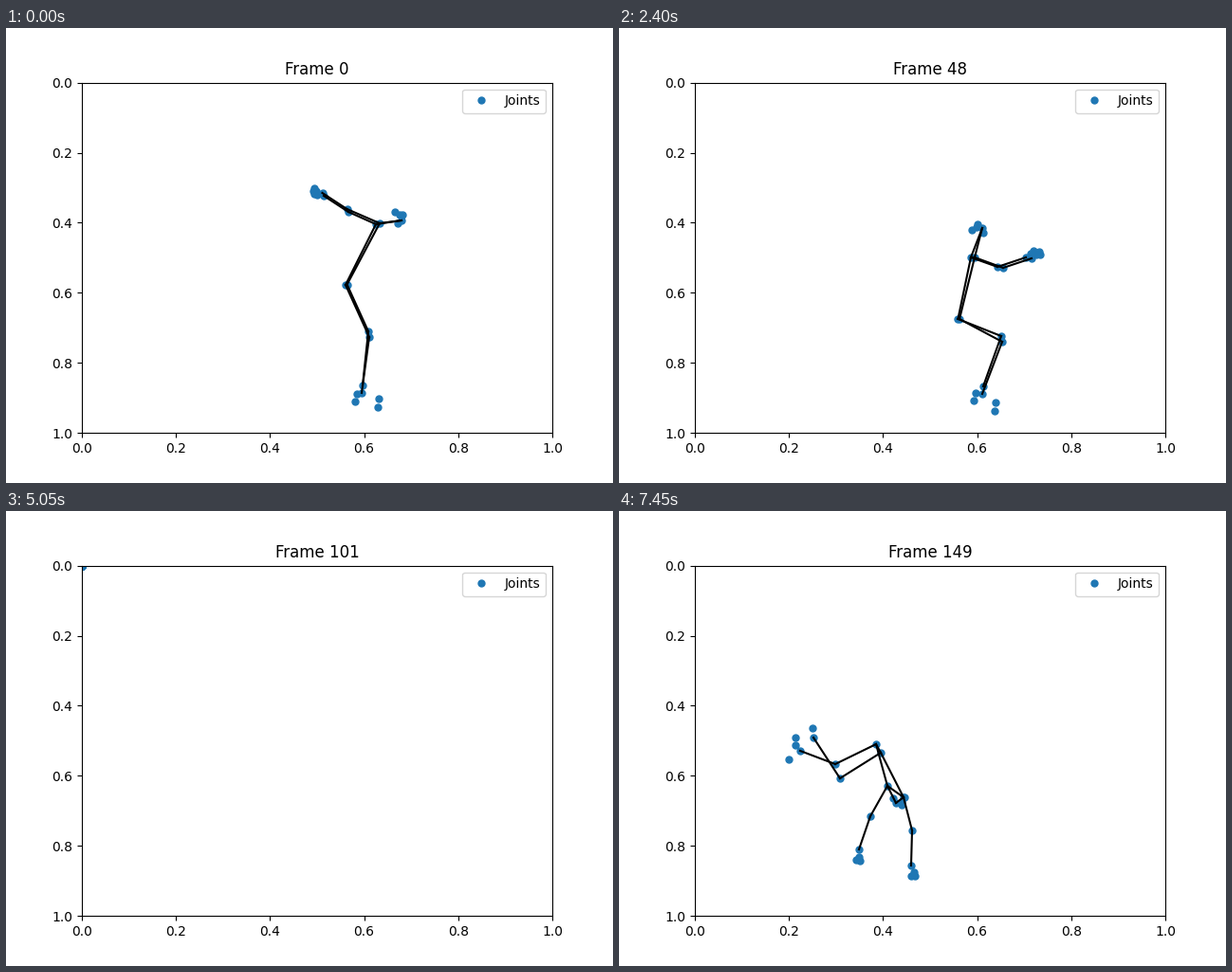
A matplotlib script for the animation above (7.5 s loop, 640x480 px).

```python
import numpy as np
import matplotlib.pyplot as plt
from matplotlib.animation import FuncAnimation

FRAMES = 150
SHOULDER, ELBOW, WRIST, HIP, KNEE, ANKLE = range(6)
NEAR, NOSE, FAR = 0, 6, 7  # six joints, the nose, six joints


def polar(r, deg):
    return r * np.exp(1j * np.radians(deg))


def points(*xy):
    return np.array(xy[::2]) + 1j * np.array(xy[1::2])


def profile(body, shoulder, arm):
    """Side view: the far limbs are the near ones, slightly shifted."""
    shift = [shoulder, arm, arm, 0.4 * shoulder, -1 - 6j, 1 - 8j]
    return np.concatenate([body, body[:NOSE] + shift])


def turn(pose, deg, hips, scale=1.0):
    """Rotate a pose about its hips and move the hips."""
    pivot = (pose[NEAR + HIP] + pose[FAR + HIP]) / 2
    return hips + (pose - pivot) * polar(scale, deg)


# Shoulder, elbow, wrist, hip, knee, ankle and nose in stage pixels
stand = profile(points(390, 207, 361, 194, 335, 177, 358, 271,
                       383, 326, 375, 385, 417, 203), 4 - 1j, -1.5 - 3j)
crouch = profile(points(390, 231, 356, 225, 325, 227, 355, 287,
                        392, 327, 378, 381, 417, 221), 5 + 3j, 9 + 4j)
sit = profile(points(375, 242, 405, 253, 435, 243, 359, 307,
                     404, 331, 383, 386, 383, 211), -4, -6 - 1j)
reach = profile(points(330, 190, 305, 166, 286, 137, 366, 265,
                       393, 315, 389, 372, 335, 166), 14 - 6j, 37 - 6j)
landed = points(279, 188, 294, 202, 306, 195, 271, 269, 267, 313, 253, 363,
                303, 180,
                301, 192, 328, 179, 343, 156, 284, 272, 300, 314, 304, 371)
inverted = points(283, 290, 265, 322, 253, 357, 271, 246, 228, 267, 191, 253,
                  292, 308,
                  300, 302, 309, 337, 308, 374, 276, 255, 233, 282, 205, 239)

keys = {
    0: stand, 28: crouch, 48: sit, 68: reach,
    73: turn(reach, -5, 350 + 250j),
    80: turn(sit, -35, 318 + 285j, 0.8),
    86: turn(sit, -75, 305 + 250j, 0.8),
    106: turn(sit, 30, 278 + 262j),
    112: turn(sit, 0, 301 + 278j),
    123: landed,
    134: turn(landed, -12, 272 + 262j),
    141: turn(inverted, 15, 304 + 244j),
    149: inverted,
}


def encode(z):
    """Store arms as bone rotations so that they swing in arcs."""
    out = z.copy()
    for s in (NEAR, FAR):
        upper = z[:, s + ELBOW] - z[:, s + SHOULDER]
        fore = z[:, s + WRIST] - z[:, s + ELBOW]
        out[:, s + ELBOW] = (np.log(np.abs(upper))
                             + 1j * np.unwrap(np.angle(upper)))
        out[:, s + WRIST] = np.log(fore / upper)
    return out


def decode(z):
    out = z.copy()
    for s in (NEAR, FAR):
        upper = np.exp(z[:, s + ELBOW])
        out[:, s + ELBOW] = z[:, s + SHOULDER] + upper
        out[:, s + WRIST] = out[:, s + ELBOW] + upper * np.exp(z[:, s + WRIST])
    return out


def spline(t, v, at):
    """Monotone cubic through the keys, one column per channel."""
    h = np.diff(t)[:, None]
    d = np.diff(v, axis=0) / h
    a, b = d[:-1], d[1:]
    same = a * b > 0
    mid = np.where(same, 2 * a * b / np.where(same, a + b, 1), 0)
    m = np.vstack([d[:1], mid, d[-1:]])
    k = np.clip(np.searchsorted(t, at, side="right") - 1, 0, len(t) - 2)
    h = h[k]
    u = (at - t[k])[:, None] / h
    return ((1 + 2 * u) * (1 - u) ** 2 * v[k] + u * (1 - u) ** 2 * h * m[k]
            + u * u * (3 - 2 * u) * v[k + 1] + u * u * (u - 1) * h * m[k + 1])


def details(z):
    """Face, fingers and feet follow the bones they sit on."""
    nose = z[:, NOSE]
    neck = nose - (z[:, NEAR + SHOULDER] + z[:, FAR + SHOULDER]) / 2
    neck /= np.abs(neck)
    ear, eye, eye2, mouth = (polar(11, -119), polar(6, -70),
                             polar(6, -100), polar(5.5, 152))
    out = [nose + neck * p for p in (ear, eye, eye2, mouth)]
    for s in (NEAR, FAR):
        wrist, ankle = z[:, s + WRIST], z[:, s + ANKLE]
        fore, shin = wrist - z[:, s + ELBOW], ankle - z[:, s + KNEE]
        out += [wrist + fore * p for p in
                (0.3 - 0.12j, 0.3 - 0.02j, 0.2 - 0.08j)]
        out += [ankle + shin * p for p in (0.165 + 0.094j, 0.207 - 0.317j)]
    return np.array(out).T


def lost(i):
    """Tracking drops out here and every joint falls to the origin."""
    return 85 <= i < 106 or 136 <= i < 141


times = np.array(list(keys), float)
coded = encode(np.array(list(keys.values())))
flat = spline(times, np.hstack([coded.real, coded.imag]), np.arange(FRAMES))
real, imag = np.hsplit(flat, 2)
joints = decode(real + 1j * imag)
joints = np.hstack([joints, details(joints)])

xs = (joints.real - 80) / 496
ys = (joints.imag - 57.6) / 369.6
for i in filter(lost, range(FRAMES)):
    xs[i] = ys[i] = 0

bones = [(NEAR + SHOULDER, FAR + SHOULDER), (NEAR + HIP, FAR + HIP)]
for s in (NEAR, FAR):
    bones += [(NOSE, s + SHOULDER), (s + SHOULDER, s + HIP)]
    bones += [(s + k, s + k + 1) for k in (SHOULDER, ELBOW, HIP, KNEE)]

fig, ax = plt.subplots(figsize=(6.4, 4.8), dpi=100)
ax.set_xlim(0, 1)
ax.set_ylim(1, 0)
dots, = ax.plot([], [], "o", markersize=5, label="Joints")
lines = [ax.plot([], [], "k-")[0] for _ in bones]
ax.legend(loc="upper right")
title = ax.set_title("Frame 0")


def update(i):
    dots.set_data(xs[i], ys[i])
    for line, (a, b) in zip(lines, bones):
        line.set_data(xs[i, [a, b]], ys[i, [a, b]])
    title.set_text(f"Frame {i}")
    return [dots, title, *lines]


anim = FuncAnimation(fig, update, frames=FRAMES, interval=50,
                     repeat=True, repeat_delay=0, blit=False)
plt.show()
```
